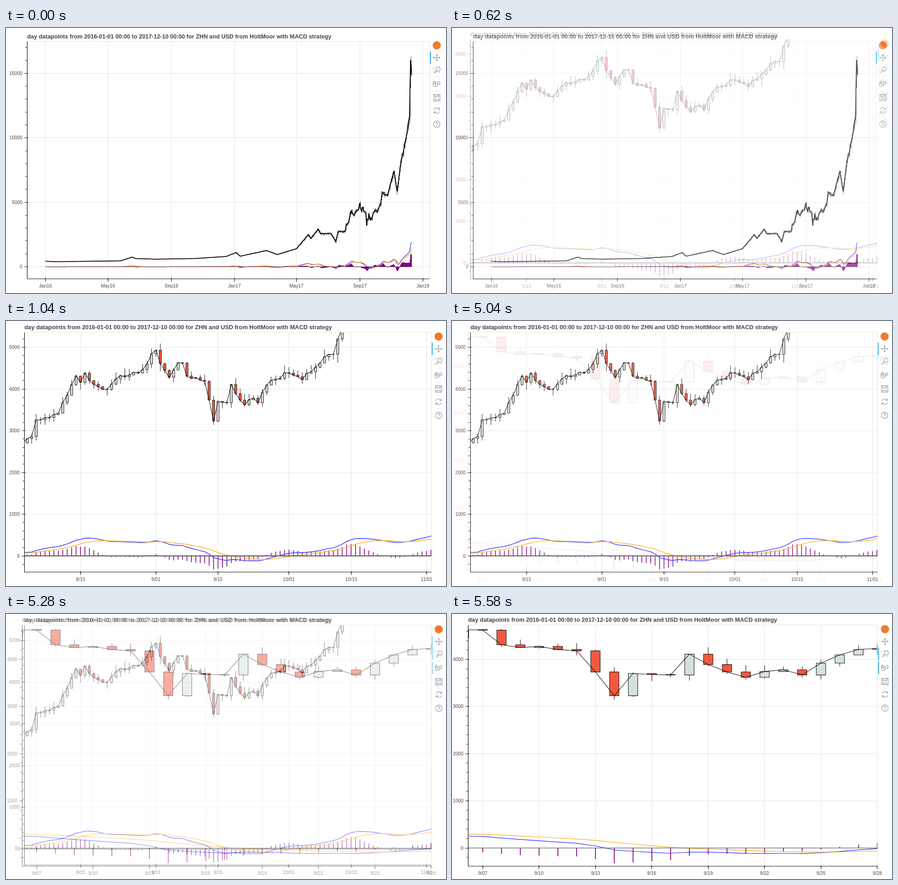
An HTML page for the animation above (8 s loop, 964 by 581 pixels).

```html
<!DOCTYPE html>
<html lang="en">
<head>
<meta charset="utf-8">
<title>Price chart zoom</title>
<style>
html, body { margin: 0; width: 100%; height: 100%; overflow: hidden; background: #fff; }
svg { display: block; width: 100vw; height: 100vh; font-family: "Liberation Sans", Arial, sans-serif; }
text { fill: #444; }
.title { font-weight: bold; }
.icon { fill: none; stroke: #a1a6a9; stroke-width: 1.4; }
#month { animation: month 8s -4ms infinite; }
#week { animation: week 8s -4ms infinite; }
@keyframes month {
  0% { opacity: 0; }
  6.25% { opacity: 0; animation-timing-function: steps(10, start); }
  13.75%, 100% { opacity: 1; }
}
@keyframes week {
  0% { opacity: 0; }
  63% { opacity: 0; animation-timing-function: steps(10, start); }
  70.5%, 100% { opacity: 1; }
}
</style>
</head>
<body>
<svg id="stage" viewBox="0 0 964 581" preserveAspectRatio="none"></svg>
<script>
const stage = document.getElementById('stage');
const TITLE = 'day datapoints from 2016-01-01 00:00 to 2017-12-10 00:00 for ZHN and USD from HoltMoor with MACD strategy';

function add(parent, tag, attrs = {}, text) {
  const node = document.createElementNS('http://www.w3.org/2000/svg', tag);
  for (const key in attrs) node.setAttribute(key, attrs[key]);
  if (text) node.textContent = text;
  return parent.appendChild(node);
}

let seed = 7;
const random = () => (seed = (seed * 16807) % 2147483647) / 2147483647;

// Turning points of the price: day number and close.
const turns = [
  [0, 430], [20, 390], [145, 460], [168, 750], [174, 640], [214, 590], [290, 640], [350, 800],
  [369, 1100], [377, 820], [428, 1260], [449, 950], [486, 1400], [509, 2500], [514, 2200],
  [528, 2920], [533, 2550], [553, 2580], [562, 1920], [567, 2750], [579, 2710], [581, 2860],
  [582, 3260], [587, 3420], [591, 4310], [592, 4160], [593, 4380], [595, 4110], [598, 3990],
  [601, 4320], [605, 4380], [609, 4930], [610, 4610], [612, 4280], [614, 4630], [615, 4620],
  [616, 4310], [620, 4180], [622, 3230], [623, 3700], [625, 3670], [626, 4110], [627, 3890],
  [629, 3620], [631, 3780], [632, 3670], [633, 3920], [635, 4210], [639, 4380], [642, 4220],
  [647, 4770], [649, 4830], [652, 5820], [656, 5580], [662, 5510], [675, 7400], [681, 5850],
  [688, 8050], [698, 9900], [705, 11680], [707, 16000], [709, 14900]
];

// Straight runs between turning points, with a little wobble on the days in between.
function closeOn(day) {
  const n = turns.findIndex(turn => turn[0] >= day);
  const [end, price] = turns[n];
  if (day === end) return price;
  const [start, from] = turns[n - 1];
  const wobble = 1 + (random() - 0.5) * 0.024;
  return (from + (price - from) * (day - start) / (end - start)) * wobble;
}

const days = [];
let fast, slow, signal = 0;
for (let day = 0; day < 710; day++) {
  const close = closeOn(day);
  const open = day ? days[day - 1].close : close;
  const wick = () => random() ** 2 * 0.045 * close;
  fast = day ? fast + (close - fast) * 2 / 13 : close;
  slow = day ? slow + (close - slow) * 2 / 27 : close;
  const macd = fast - slow;
  signal += (macd - signal) * 0.2;
  days.push({
    day, open, close, macd, signal,
    high: Math.max(open, close) + wick(),
    low: Math.min(open, close) - wick()
  });
}

const ICONS = [
  [27, 'M-7 0H7M0-7V7M-5-2-7 0-5 2M5-2 7 0 5 2M-2-5 0-7 2-5M-2 5 0 7 2 5'],
  [85, 'M-8-2a3 4 0 0 1 6 0v4a3 4 0 0 1-6 0zM-8-1h6M-5-6v5M1-2a3 3 0 1 0 6 0a3 3 0 1 0-6 0M2 1-1 6'],
  [115, 'M-7-7H7V7H-7zM-4-7V-2H4V-7M2-6v2M-4 7V3H4V7'],
  [143, 'M-6-2A6 6 0 0 1 5-3M6 2A6 6 0 0 1-5 3M2-3h4v-4M-2 3h-4v4'],
  [173, 'M-7 0a7 7 0 1 0 14 0a7 7 0 1 0-14 0M-2.3-1.5a2.3 2.3 0 1 1 3.6 1.8Q0 1 0 2M0 3.5v1.4']
];

function drawToolbar(layer, view) {
  const bar = add(layer, 'g', { transform: `translate(${view.tools})`, class: 'icon' });
  add(bar, 'circle', { r: 9, style: 'fill:#ee7b30;stroke:none' });
  for (const [y, d] of ICONS) add(bar, 'path', { d, transform: `translate(0 ${y})` });
  add(bar, 'path', { d: 'M-8 47H6V61H-8z', 'stroke-dasharray': '2 2', 'stroke-width': 1 });
  add(bar, 'circle', { cx: 3, cy: 52, r: 4.5, fill: '#fff' });
  add(bar, 'path', { d: 'M0 55-5 60', 'stroke-width': 2 });
  add(bar, 'path', { d: 'M-5 69H5M-5 100H5M-5 129H5M-5 158H5', stroke: '#e2e2e2', 'stroke-width': 1 });
  for (const y of view.active) {
    add(bar, 'path', { d: `M-14 ${y - 13.5}v27`, stroke: '#26aae1', 'stroke-width': 2 });
  }
}

const snap = v => Math.floor(v) + 0.5;

function drawGrid(layer, view, x, y) {
  const [left, top, right, bottom] = view.box;
  let grid = `M${left} ${top}H${right}V${bottom}`;
  let axis = `M${left} ${top}V${bottom}H${right}`;
  const label = (text, lx, ly, anchor) =>
    add(layer, 'text', { x: lx, y: ly, 'font-size': 10.3, 'text-anchor': anchor }, text);

  for (const [text, day] of view.dates) {
    const px = snap(x(day));
    grid += `M${px} ${top}V${bottom}`;
    axis += `M${px} ${bottom - 2}v8`;
    label(text, px, bottom + 19, 'middle');
  }
  const minor = view.step / 5;
  for (let value = -minor; y(value) > top; value += minor) {
    const py = snap(y(value)), major = value % view.step === 0;
    if (py > bottom) continue;
    axis += major ? `M${left - 6} ${py}h8` : `M${left - 4} ${py}h4`;
    if (!major) continue;
    grid += `M${left} ${py}H${right}`;
    label(String(value), left - 10.5, py + 3.5, 'end');
  }
  add(layer, 'path', { d: grid, fill: 'none', stroke: '#e5e5e5' });
  return axis;
}

function draw(view) {
  const [left, top, right, bottom] = view.box;
  const x = day => +(view.x0 + (day - view.day0) * view.dx).toFixed(2);
  const y = value => +(view.y0 - value * view.dy).toFixed(2);
  const layer = add(stage, 'g', { id: view.id });
  add(layer, 'rect', { width: 964, height: 581, fill: '#fff' });
  const axis = drawGrid(layer, view, x, y);

  const clip = add(layer, 'clipPath', { id: view.id + 'Clip' });
  add(clip, 'rect', { x: left, y: top, width: right - left, height: bottom - top });
  const plot = add(layer, 'g', { 'clip-path': `url(#${view.id}Clip)`, fill: 'none' });
  const path = (d, stroke, width, fill = 'none') =>
    add(plot, 'path', { d, stroke, 'stroke-width': width, fill, 'stroke-linejoin': 'round' });
  const shown = days.filter(p => x(p.day) > left - 60 && x(p.day) < right + 60);
  const curve = key => 'M' + shown.map(p => x(p.day) + ' ' + y(p[key])).join('L');
  const each = (list, shape) => list.map(shape).join('');
  const half = view.dx / 4;
  const body = p => `M${x(p.day) - half} ${y(p.open)}h${2 * half}V${y(p.close)}h${-2 * half}z`;

  path(each(shown, p => `M${x(p.day)} ${y(p.high)}V${y(p.low)}`), '#222', view.wick);
  path(each(shown.filter(p => p.close >= p.open), body), '#111', view.edge, '#d5e1dd');
  path(each(shown.filter(p => p.close < p.open), body), '#111', view.edge, '#f2583e');
  path(curve('close'), '#111', view.line);
  path(each(shown, p => `M${x(p.day)} ${y(0)}V${y(2 * (p.macd - p.signal))}`), '#800080', view.bar);
  path(curve('macd'), view.blue, view.curve);
  path(curve('signal'), view.orange, view.curve);
  path(`M${x(shown[0].day)} ${y(0)}H${x(shown[shown.length - 1].day)}`, view.base, view.zero);

  add(layer, 'path', { d: axis, fill: 'none', stroke: '#111', 'stroke-width': 1.2 });
  add(layer, 'text', { x: left, y: top - 6.8, class: 'title', 'font-size': view.font }, TITLE);
  drawToolbar(layer, view);
}

draw({
  id: 'years', box: [46.5, 29.5, 928.5, 550], x0: 86.3, day0: 0, dx: 1.1315, y0: 523.5, dy: 0.02827,
  step: 5000, font: 12.7, tools: [943.8, 38], active: [27],
  wick: 0.8, edge: 0.9, line: 1.8, bar: 1.3, curve: 1.2, zero: 1.2,
  blue: '#22f', orange: '#ffa500', base: '#5c2a50',
  dates: [['Jan16', 0], ['May16', 121], ['Sep16', 244], ['Jan17', 366], ['May17', 486], ['Sep17', 609], ['Jan18', 731]]
});
draw({
  id: 'month', box: [40.5, 25, 932, 550.5], x0: 46.6, day0: 580, dx: 9.718, y0: 515, dy: 0.0915,
  step: 1000, font: 12.83, tools: [947.8, 34], active: [27],
  wick: 1.1, edge: 1, line: 1.1, bar: 1.6, curve: 1.7, zero: 1.8,
  blue: '#4a4aff', orange: '#ffb733', base: '#555',
  dates: [['8/15', 592], ['9/01', 609], ['9/15', 623], ['10/01', 639], ['10/15', 653], ['11/01', 670]]
});
draw({
  id: 'week', box: [35.5, 24, 932, 553], x0: 67.3, day0: 615, dx: 41.17, y0: 513, dy: 0.10338,
  step: 1000, font: 12.9, tools: [948.6, 33.2], active: [54, 85],
  wick: 1.2, edge: 1.1, line: 1.1, bar: 1.8, curve: 1.2, zero: 1.1,
  blue: '#22f', orange: '#ffa500', base: '#444',
  dates: ['07', '10', '13', '16', '19', '22', '25', '28'].map((d, i) => ['9/' + d, 615 + 3 * i])
});
</script>
</body>
</html>
```
